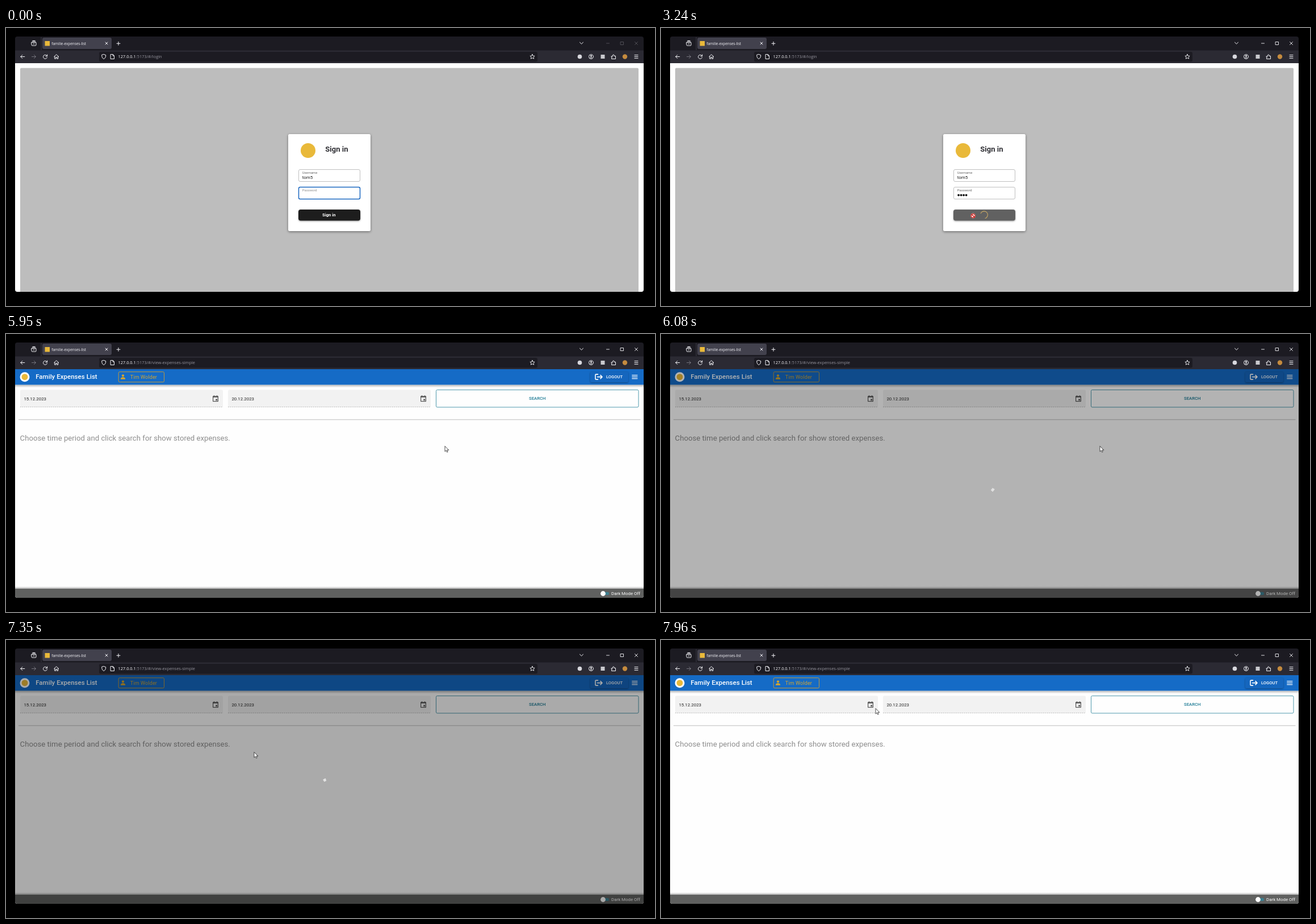
These frames come from a looping animation (1143 px wide and 490 px high, 8 s). An HTML page with a canvas:

```html
<!DOCTYPE html>
<html lang="en">
<head>
<meta charset="utf-8">
<title>Expenses app walkthrough</title>
<style>
html, body { margin: 0; width: 100%; height: 100%; overflow: hidden; background: #000; }
canvas { display: block; }
</style>
</head>
<body>
<canvas id="stage" width="1143" height="490"></canvas>
<script>
const ctx = document.getElementById('stage').getContext('2d');
const LOOP = 8000;
const UI = '"Open Sans", "Noto Sans", sans-serif';
const ROBOTO = 'Roboto, Arial, sans-serif';
const TEAL = '#1d7b95', GOLD = '#d6a52d', LOGO = '#e9b93a', LIGHT = '#f4f4f8';

// Moments of the story, in ms
const T = {
  mouseIn: 110, activate: 950, hideMouse: 1490, dots: [1540, 1760, 2030, 2180],
  moveAgain: 2240, submit: 2640, blur: 2890, home: 3760,
  hover: 5270, list: 5600, loading: 5955, loaded: 7285
};

// Mouse stops: time, x, y
const STOPS = [
  [70, 962, 438], [800, 600, 288], [1000, 549, 292],
  [2240, 549, 292], [2520, 549.5, 331], [4700, 550, 331],
  [5430, 773, 198], [6230, 773, 198], [7060, 414, 191],
  [7350, 437, 198], [7960, 378, 121]
];

const clamp = v => Math.min(1, Math.max(0, v));
const smooth = v => v * v * (3 - 2 * v);

// CSS cubic-bezier(x1, 0, x2, 1)
function ease(x, x1, x2) {
  let lo = 0, hi = 1;
  for (let i = 0; i < 24; i++) {
    const s = (lo + hi) / 2, r = 1 - s;
    if (3 * r * r * s * x1 + 3 * r * s * s * x2 + s * s * s < x) lo = s; else hi = s;
  }
  return smooth(lo);
}

function mouseAt(t) {
  let a = STOPS[0];
  for (const b of STOPS) {
    if (t < b[0]) {
      const k = a === b ? 0 : smooth((t - a[0]) / (b[0] - a[0]));
      return [a[1] + (b[1] - a[1]) * k, a[2] + (b[2] - a[2]) * k];
    }
    a = b;
  }
  return [a[1], a[2]];
}

function fill(x, y, w, h, color, radius = 0) {
  ctx.fillStyle = color;
  ctx.beginPath();
  ctx.roundRect(x, y, w, h, radius);
  ctx.fill();
}

function frame(x, y, w, h, color, radius = 2, line = 1) {
  ctx.strokeStyle = color;
  ctx.lineWidth = line;
  ctx.beginPath();
  ctx.roundRect(x, y, w, h, radius);
  ctx.stroke();
}

function disc(x, y, r, color) {
  ctx.fillStyle = color;
  ctx.beginPath();
  ctx.arc(x, y, r, 0, 7);
  ctx.fill();
}

function text(str, x, y, size, color, { weight = 400, family = ROBOTO, align = 'left', spacing = 0 } = {}) {
  ctx.font = `${weight} ${size}px ${family}`;
  ctx.letterSpacing = spacing + 'px';
  ctx.textAlign = align;
  ctx.fillStyle = color;
  ctx.fillText(str, x, y);
}

function icon(x, y, path, color = LIGHT, line = 1, filled = false) {
  ctx.save();
  ctx.translate(x, y);
  const shape = new Path2D(path);
  ctx.lineCap = ctx.lineJoin = 'round';
  ctx.lineWidth = line;
  ctx.strokeStyle = ctx.fillStyle = color;
  filled ? ctx.fill(shape) : ctx.stroke(shape);
  ctx.restore();
}

function shadow(blur, dy, alpha) {
  ctx.shadowColor = `rgba(0,0,0,${alpha})`;
  ctx.shadowBlur = blur;
  ctx.shadowOffsetY = dy;
}

function fade(y, h, from, to) {
  const g = ctx.createLinearGradient(0, y, 0, y + h);
  g.addColorStop(0, `rgba(0,0,0,${from})`);
  g.addColorStop(1, `rgba(0,0,0,${to})`);
  fill(16, y, 1107, h, g);
}

// Material spinner: a turning ring whose dash grows, then runs out
function spinner(x, y, size, t, color, line) {
  const unit = size / 50, part = t % 1500;
  const k = ease((part % 750) / 750, .42, .58);
  const growing = part < 750;
  const from = growing ? 35 * k : 35 + 89 * k;
  const to = Math.min(from + (growing ? 1 + 88 * k : 89), 40 * Math.PI);
  const turn = t / 2000 * 2 * Math.PI;
  ctx.strokeStyle = color;
  ctx.lineWidth = line;
  ctx.lineCap = 'butt';
  ctx.beginPath();
  ctx.arc(x, y, 20 * unit, turn + from / 20, turn + to / 20);
  ctx.stroke();
}

function drawBrowser(t) {
  fill(16, 15, 1107, 30, '#1c1b22', [4, 4, 0, 0]);
  fill(16, 39.5, 1107, 22.5, '#2b2a33');
  fill(61.5, 16, 1, 23, '#3b3a44');
  icon(49, 27, 'M-4-1.5H4V3Q4 4 3 4H-3Q-4 4-4 3ZM-3-3.2H3M-2-4.6H2M-1 1H1');
  fill(64, 17, 122, 20, '#42414d', 3);
  fill(68.5, 23, 8.5, 8.5, LOGO);
  text('familie-expenses-list', 80.3, 29.6, 6.4, LIGHT, { family: UI });
  icon(177, 27, 'M-2-2L2 2M2-2L-2 2');
  icon(198, 27.3, 'M-3 0H3M0-3V3');
  icon(1013.5, 26.5, 'M-3-1.3L0 1.6L3-1.3');
  const controls = t < T.activate ? '#55545c' : LIGHT;
  icon(1060, 27, 'M-2.5 0H2.5', controls, .9);
  icon(1085, 27, 'M-2.5-2.5H2.5V2.5H-2.5Z', controls, .9);
  icon(1110, 27, 'M-2.5-2.5L2.5 2.5M2.5-2.5L-2.5 2.5', controls, .9);

  const arrow = 'M3.5 0H-3.5M-.5-3L-3.5 0L-.5 3';
  icon(29.3, 50.5, arrow);
  icon(49, 50.5, 'M-3.5 0H3.5M.5-3L3.5 0L.5 3', '#74737c');
  icon(69, 50.7, 'M3.4-1A3.5 3.5 0 1 0 3.4 1.2M3.6-3.8V-1H.8');
  icon(88.7, 50.5, 'M-4 0L0-3.8L4 0M-3-.8V3.7H-1V1H1V3.7H3V-.8');
  fill(164, 42, 772, 17.5, '#1c1b22', 3);
  icon(172.2, 50.5, 'M0-4L3.5-2.8Q3.8 2.2 0 4Q-3.8 2.2-3.5-2.8Z');
  icon(187.5, 50.5, 'M-3-4H.8L3-1.7V4H-3ZM.7-3.8V-1.5H2.8');
  icon(927, 50.3, 'M0-4L1.2-1.3L4.1-1L2 1L2.6 3.9L0 2.4L-2.6 3.9L-2-1L-4.1-1L-1.2-1.3Z'.replace('L-2-1', 'L-2 1'), LIGHT, .9);

  const path = t < T.home ? 'login' : t < T.list ? '' : 'view-expenses-simple';
  text('127.0.0.1', 197.5, 53.4, 7.4, '#fbfbfe', { family: UI });
  text(':5173/#/' + path, 197.5 + ctx.measureText('127.0.0.1').width, 53.4, 7.4, '#95949d', { family: UI });

  disc(1010.5, 50.5, 3.8, '#d8d8de');
  icon(1030.5, 50.5, 'M4 0A4 4 0 1 1-4 0A4 4 0 1 1 4 0');
  disc(1030.5, 49.2, 1.5, LIGHT);
  icon(1030.5, 50.5, 'M-2.5 2.6Q0 0 2.5 2.6Z', LIGHT, 1, true);
  fill(1047.5, 47, 7, 7, '#c9c9ce');
  icon(1070, 50.8, 'M-3.5-1H-1.5V-3Q0-5 1-3V-1.5H3.5V3.7H-3.5V2Q-1 1-3.5 .5Z');
  disc(1090, 50.5, 4.2, '#c58b3e');
  icon(1110, 50.5, 'M-3-2.8H3M-3 0H3M-3 2.8H3');
}

function drawField(y, label, focused, labelColor) {
  fill(515, y, 109, 22, '#fff', 2.5);
  frame(515.5, y + .5, 108, 21, focused ? '#1967c0' : '#c0c0c0', 2.5, focused ? 1.5 : 1);
  text(label, 521.8, y + 8.4, 5.85, labelColor);
}

function drawLogin(t) {
  fill(25, 70.5, 1089, 395, '#bdbdbd', [2, 2, 0, 0]);
  ctx.save();
  shadow(4, 1.2, .45);
  fill(497, 187, 145, 171, '#fff', 2.5);
  ctx.restore();
  disc(532, 216, 13, LOGO);
  text('Sign in', 562.3, 218, 13, '#2e2e33', { weight: 700 });

  drawField(249, 'Username', false, '#666');
  text('tom5', 521.8, 265.8, 7.9, '#1d1d1d');
  drawField(280, 'Password', t < T.blur, t < T.activate ? '#8d8d8d' : '#666');
  const typed = T.dots.filter(at => t >= at).length;
  for (let i = 0; i < typed; i++) disc(524.1 + 4.5 * i, 294.6, 1.9, '#111');
  if (t > T.activate && t < T.submit && (t - T.activate) % 1000 < 500)
    fill(522 + 4.5 * typed, 290.5, .7, 8, '#222');

  const busy = t >= T.submit;
  const hovered = !busy && t > 2440;
  ctx.save();
  shadow(3, 1, .4);
  fill(515, 320, 109, 19.5, busy ? '#616161' : hovered ? '#3f3f3f' : '#1d1d1d', 4);
  ctx.restore();
  if (busy) spinner(569, 329.3, 16, t - T.submit, '#c9a862', 1.1);
  else text('Sign in', 568.7, 332.1, 7.6, '#fff', { weight: 700, align: 'center' });
}

function drawShell() {
  fade(89.5, 5, .28, 0);
  fill(16, 62, 1107, 27.5, '#156bc6');
  disc(33, 75.7, 8.5, '#fff');
  disc(33, 75.7, 5.5, LOGO);
  text('Family Expenses List', 52.2, 79.3, 11.5, '#fff', { weight: 500, spacing: .03 });
  frame(198.2, 66.7, 80.3, 18, '#c0993c', 2);
  disc(206, 73.3, 2.1, GOLD);
  icon(206, 75.7, 'M-4 4V2.8Q-3.5 .3 0 .3Q3.5 .3 4 2.8V4Z', GOLD, 1, true);
  text('Tim Wolder', 218.8, 78.6, 9, GOLD, { spacing: .15 });

  ctx.save();
  shadow(3, 1, .35);
  fill(1029, 66.5, 67, 18.5, '#1566be', 2);
  ctx.restore();
  icon(1044, 75.6, 'M-1.5-4.5H-5Q-6-4.5-6-3.5V3.5Q-6 4.5-5 4.5H-1.5M-2.5 0H5.8M3-3L6 0L3 3', '#fff', 1.6);
  text('LOGOUT', 1057, 78.2, 7.6, '#fff', { weight: 500 });
  icon(1107.3, 75.6, 'M-4.6-3H4.6M-4.6 0H4.6M-4.6 3H4.6', '#fff', 1.2);

  fade(445, 4, 0, .3);
  fill(16, 449, 1107, 16, '#606160');
  fill(1050, 454.7, 12, 5.4, '#3d7f90', 2.7);
  disc(1051.5, 457.5, 4.4, '#fff');
  text('Dark Mode Off', 1066, 460.2, 7.9, '#fff');
}

function drawButton(x, y, w, h, label, size, hovered) {
  if (hovered) fill(x, y, w, h, 'rgba(29,123,149,.15)', 2);
  frame(x + .5, y + .5, w - 1, h - 1, '#4f99ad');
  text(label, x + w / 2, y + h / 2 + size * .355, size, TEAL, { weight: 500, align: 'center' });
}

function drawHome(t) {
  const hovered = t > T.hover;
  drawButton(42, 116, 502, 34.5, 'EDIT CATEGORY', 13.1);
  drawButton(596, 116, 501, 34.5, 'EDIT CATEGORY COMPOSITION', 13.1);
  drawButton(42, 177, 502, 33.5, 'ADD EXPENSES', 13.1);
  drawButton(596, 177, 501, 33.5, 'SHOW EXPENSES (TIME-PERIOD)', 13.1, hovered);
  if (hovered) {
    fill(16, 452, 137, 13, '#42414d', [0, 2, 0, 0]);
    text('127.0.0.1:5173/#/view-expenses-simple', 19, 461, 6.4, LIGHT, { family: UI });
  }
}

function drawDate(x, value) {
  fill(x, 98.5, 357, 30.5, '#f2f2f2', [2, 2, 0, 0]);
  ctx.save();
  ctx.setLineDash([1.7, 1.7]);
  ctx.strokeStyle = '#a5a5a5';
  ctx.lineWidth = .8;
  ctx.beginPath();
  ctx.moveTo(x, 128.6);
  ctx.lineTo(x + 357, 128.6);
  ctx.stroke();
  ctx.restore();
  text(value, x + 6.4, 116.6, 7.9, '#222');
  icon(x + 344, 114, 'M-4.4-4.2H4.4V4.6H-4.4ZM-4.4-2.8H4.4M-2.5-5.4V-4M2.5-5.4V-4', '#555', 1.2);
  fill(x + 344.3, 114.4, 2.8, 2.8, '#555');
}

function drawList() {
  drawDate(25, '15.12.2023');
  drawDate(391, '20.12.2023');
  drawButton(757, 98, 357.5, 31.5, 'SEARCH', 7.7);
  fill(22, 150.3, 1095.5, 1.2, '#cacaca');
  text('Choose time period and click search for show stored expenses.', 24.6, 187.8, 13.2, '#8e8e8e');
}

function drawLoading(t) {
  const shown = ease(clamp((t - T.loading) / 300), 0, .58);
  const gone = ease(clamp((t - T.loaded) / 300), 0, .58);
  const opacity = shown * (1 - gone);
  if (t < T.loading || opacity < .002) return;
  ctx.save();
  ctx.globalAlpha = opacity;
  fill(16, 62, 1107, 403, 'rgba(0,0,0,.5)');
  spinner(569.5, 263.5, 46.2, t - T.loading, '#fff', 4.6);
  ctx.restore();
}

function drawMouse(t) {
  if (t < T.mouseIn || (t >= T.hideMouse && t < T.moveAgain)) return;
  const [x, y] = mouseAt(t);
  const inField = t < T.home && x > 515 && x < 624 && y > 280 && y < 302;
  const onButton = (t < T.submit && t > 2440) || (t > T.hover && t < T.list);
  if (inField) {
    icon(x, y, 'M-1.5-4.5H1.5M0-4.5V4.5M-1.5 4.5H1.5', '#222', .8);
  } else if (t >= T.submit && t < T.home) {
    disc(x, y, 4.4, '#fff');
    icon(x, y, 'M3.5 0A3.5 3.5 0 1 1-3.5 0A3.5 3.5 0 1 1 3.5 0M-2.4-2.4L2.4 2.4', '#c8201c', 1.5);
  } else {
    const shape = onButton
      ? 'M-1 0Q0-1 1 0V3.5L4.5 4.5Q5 8 3.5 10H-1.5L-4 6Q-3 4.5-1 6Z'
      : 'M0 0V9.2L2.2 7.2L3.7 10.4L5.2 9.7L3.8 6.6H6.5Z';
    icon(x, y, shape, '#fff', 1, true);
    icon(x, y, shape, '#222', .8);
  }
}

function draw(t) {
  fill(0, 0, 1143, 490, '#000');
  drawBrowser(t);
  ctx.save();
  ctx.beginPath();
  ctx.roundRect(16, 62, 1107, 403, [0, 0, 4, 4]);
  ctx.clip();
  fill(16, 62, 1107, 403, t < T.home ? '#fff' : '#fefefe');
  if (t < T.home) {
    drawLogin(t);
  } else {
    drawShell();
    t < T.list ? drawHome(t) : drawList();
    drawLoading(t);
  }
  ctx.restore();
  drawMouse(t);
}

const start = performance.now();
function tick() {
  draw((performance.now() - start) % LOOP);
  requestAnimationFrame(tick);
}
tick();
</script>
</body>
</html>
```
